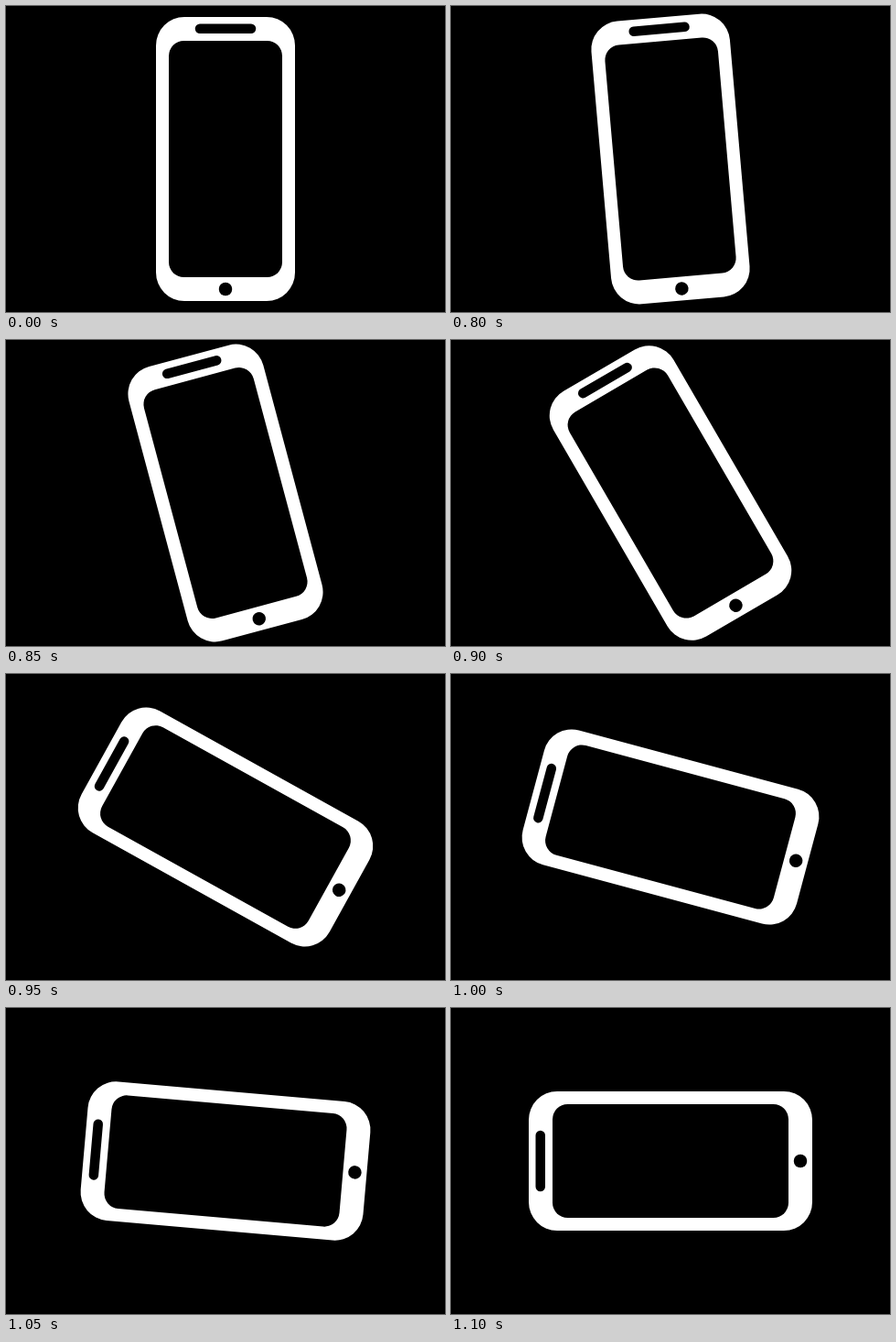
Recreate the animation shown at these times as an HTML page. Size 480 by 334 pixels, loop 2.2 s.

```html
<!DOCTYPE html>
<html lang="en">
<head>
<meta charset="utf-8">
<title>Rotate the phone</title>
<style>
  html, body { margin: 0; width: 100%; height: 100%; overflow: hidden; background: #000; }
  svg { display: block; width: 100vw; height: 100vh; }
</style>
</head>
<body>
<svg viewBox="0 0 480 334">
  <!-- the phone is drawn around its centre of rotation -->
  <g id="phone" transform="translate(240 167)">
    <rect x="-76" y="-155" width="152" height="310" rx="31" fill="#fff"/>
    <rect x="-62" y="-129" width="124" height="258" rx="16.5"/>
    <rect x="-33.25" y="-147.5" width="66.5" height="10.5" rx="5.25"/>
    <circle cy="142" r="7.25"/>
  </g>
</svg>
<script>
  const LOOP = 2200;
  // [start in ms, degrees turned to the left]
  const STEPS = [
    [0, 0], [800, 5], [850, 15], [900, 30.2],
    [950, 61], [1000, 75], [1050, 85], [1100, 90]
  ];
  const phone = document.getElementById('phone');
  const start = performance.now();

  function angleAt(time) {
    let angle = 0;
    for (const [from, degrees] of STEPS) if (time >= from) angle = degrees;
    return angle;
  }

  function draw(now) {
    const time = Math.max(0, now - start) % LOOP;
    phone.setAttribute('transform', `translate(240 167) rotate(${-angleAt(time)})`);
    requestAnimationFrame(draw);
  }
  draw(start);
</script>
</body>
</html>
```
